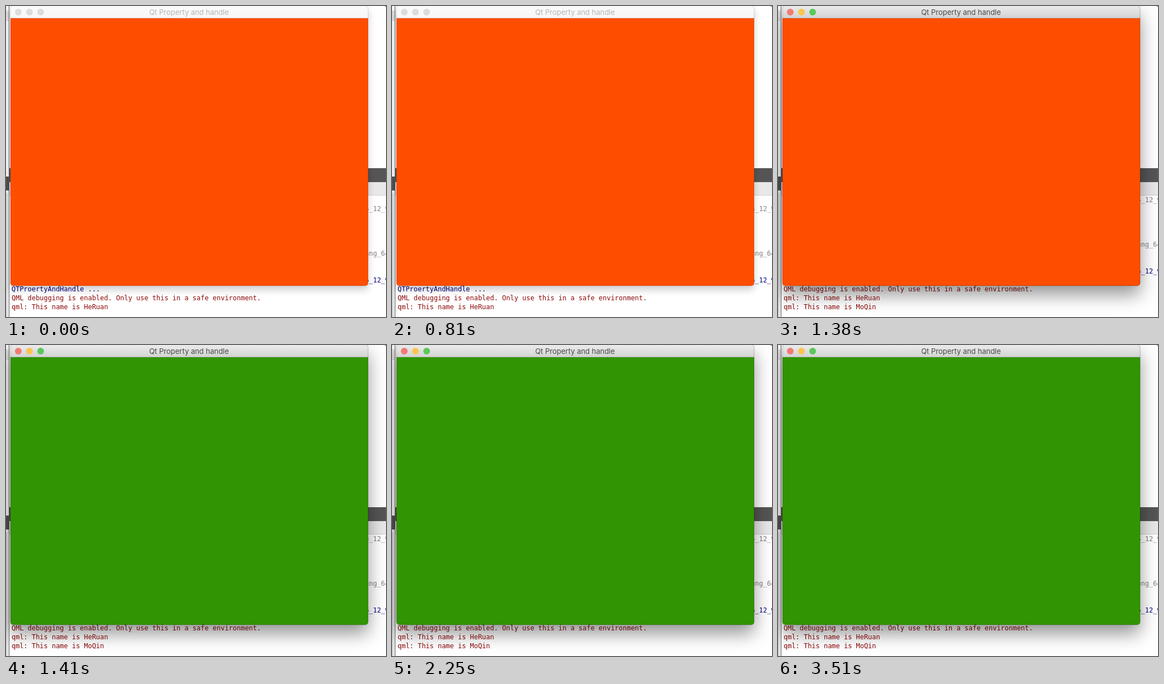
An HTML page with a canvas for the animation above (3540 ms loop, 680 px wide and 558 px high).

```html
<!DOCTYPE html>
<html lang="en">
<head>
<meta charset="utf-8">
<title>Qt Property and handle</title>
<style>
  html, body { margin: 0; width: 100%; height: 100%; overflow: hidden; background: #fff; }
  canvas { display: block; }
</style>
</head>
<body>
<canvas id="stage" width="680" height="558"></canvas>
<script>
const ctx = document.getElementById('stage').getContext('2d');

const LOOP = 3540;
const FOCUS_AT = 1230;
const LOG_AT = 1320;
const COLOR_AT = 1410;
const LINE = 16;
const WIN = { x: 8, y: -0.5, w: 640, h: 502.5, r: 5, bar: 22 };

function box(color, x, y, w, h) {
  ctx.fillStyle = color;
  ctx.fillRect(x, y, w, h);
}

function label(text, x, y, color) {
  ctx.fillStyle = color;
  ctx.fillText(text, x, y);
}

function windowPath() {
  ctx.beginPath();
  ctx.roundRect(WIN.x, WIN.y, WIN.w, WIN.h, WIN.r);
}

function drawBackdrop() {
  box('#ffffff', 0, 0, 680, 558);
  box('#555555', 678, 0, 2, 1);

  // Editor status bar and output toolbar
  box('#555555', 6, 291, 674, 25);
  box('#e8e8e8', 6, 316, 674, 23);
  box('#cfcfcf', 6, 339, 674, 1);

  // Side panel
  box('#f4f4f4', 0, 0, 5, 306);
  box('#dcdcdc', 0, 8, 5, 19);
  box('#505050', 0, 306, 5, 25);
  box('#ececec', 0, 331, 5, 227);
  box('#b8b8b8', 1, 336, 1, 222);
  box('#5c5c5c', 5, 0, 1, 558);
}

function drawLog(scrolled) {
  const shift = scrolled ? LINE : 0;
  const gray = '#808080', navy = '#000080', red = '#8b0a0a';
  ctx.font = '11.96px "DejaVu Sans Mono", monospace';
  ctx.textAlign = 'left';

  label('6_12_9', 642.3, 368 - shift, gray);
  label('ung_64', 642.3, 448 - shift, gray);
  label('6_12_9', 642.3, 496 - shift, navy);

  const lines = [
    ['QTProertyAndHandle ...', navy],
    ['QML debugging is enabled. Only use this in a safe environment.', red],
    ['qml: This name is HeRuan', red],
    ['qml: This name is MoQin', red]
  ];
  const first = scrolled ? 1 : 0;
  lines.slice(first, first + 3).forEach(([text, color], i) =>
    label(text, 10, 512 + i * LINE, color));
}

function drawShadow(active) {
  ctx.save();
  ctx.shadowColor = active ? 'rgba(0,0,0,0.42)' : 'rgba(0,0,0,0.2)';
  ctx.shadowBlur = active ? 32 : 14;
  ctx.shadowOffsetY = active ? 16 : 7;
  ctx.fillStyle = '#fff';
  windowPath();
  ctx.fill();
  ctx.restore();
}

function drawWindow(active, color) {
  drawShadow(active);
  ctx.save();
  windowPath();
  ctx.clip();
  box(color, WIN.x, WIN.bar, WIN.w, 502 - WIN.bar);

  const bar = ctx.createLinearGradient(0, 0, 0, WIN.bar);
  bar.addColorStop(0, active ? '#ebebeb' : '#fafafa');
  bar.addColorStop(1, active ? '#d3d3d3' : '#f8f8f8');
  box(bar, WIN.x, 0, WIN.w, WIN.bar);
  box(active ? '#b3b3b3' : '#d8d0d0', WIN.x, WIN.bar - 1, WIN.w, 1);
  ctx.restore();

  windowPath();
  ctx.strokeStyle = active ? 'rgba(0,0,0,0.22)' : 'rgba(0,0,0,0.14)';
  ctx.lineWidth = 1;
  ctx.stroke();

  const lights = active ? ['#f27b72', '#f8c64f', '#57c95c'] : Array(3).fill('#dcdcdc');
  lights.forEach((light, i) => {
    ctx.fillStyle = light;
    ctx.beginPath();
    ctx.arc(22 + i * 20, 11, 6, 0, Math.PI * 2);
    ctx.fill();
  });

  ctx.font = '13px Inter, sans-serif';
  ctx.textAlign = 'center';
  label('Qt Property and handle', 327.5, 16, active ? '#484848' : '#b5b5b5');
}

function render(now) {
  const t = now % LOOP;
  drawBackdrop();
  drawLog(t >= LOG_AT);
  drawWindow(t >= FOCUS_AT, t >= COLOR_AT ? '#319402' : '#ff4d00');
}

const start = performance.now();
function tick() {
  render(performance.now() - start);
  requestAnimationFrame(tick);
}
tick();
</script>
</body>
</html>
```
